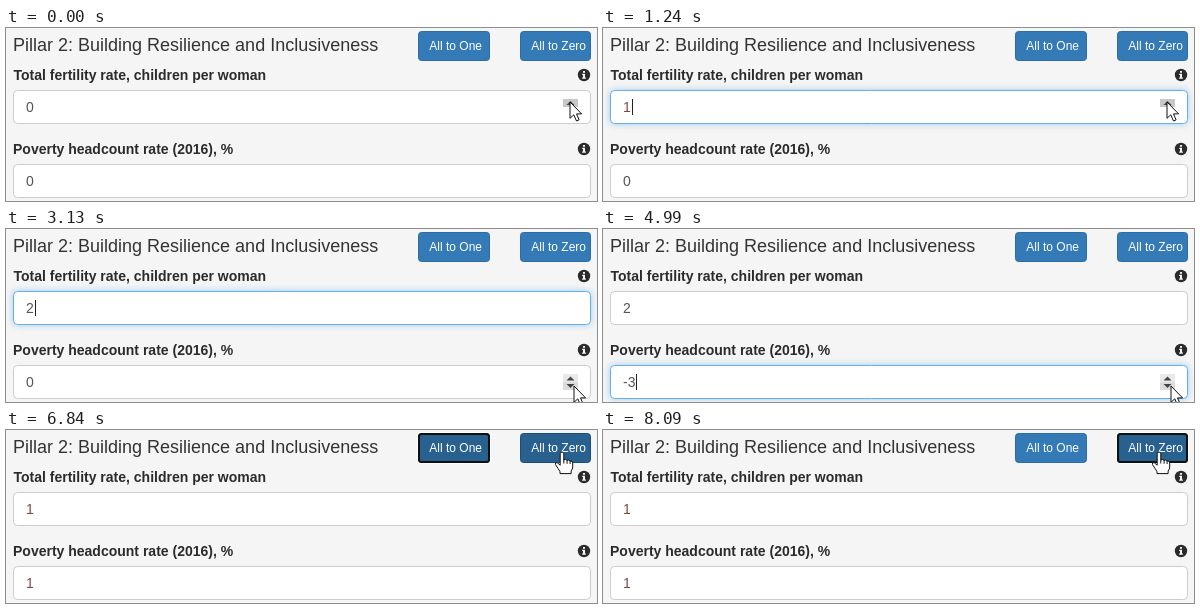
Animation, 591 px wide and 173 px high, one loop 8710 ms. Source, as an HTML page:

```html
<!DOCTYPE html>
<html lang="en">
<head>
<meta charset="utf-8">
<title>Pillar form</title>
<style>
  html, body { margin: 0; width: 100%; height: 100%; overflow: hidden; background: #f5f5f5; }
  svg { display: block; width: 591px; height: 173px; font-family: "Liberation Sans", Arial, sans-serif; }
  .title { font-size: 18px; fill: #333; }
  .label { font-size: 14px; font-weight: bold; fill: #2b2b2b; }
  .value { font-size: 14px; fill: #555; }
  .field { fill: #fff; stroke: #ccc; }
  .field.focus { stroke: #66afe9; filter: drop-shadow(0 0 3.5px rgba(102, 175, 233, .6)); }
  .button text { font-size: 12px; fill: #fff; }
  .button .face { fill: #337ab7; stroke: #2e6da4; }
  .button.dark .face { fill: #286090; stroke: #204d74; }
  .button.down .face { fill: #204d74; stroke: #122b40; }
  .ring { fill: none; }
  .cursor { fill: #fff; stroke: #111; stroke-linejoin: round; }
  #halo { fill: #fbf04a; mix-blend-mode: multiply; }
</style>
</head>
<body>
<svg id="stage" viewBox="0 0 591 173"></svg>
<script>
const stage = document.getElementById('stage');
const LOOP = 8710;

const infoIcon = y => `
  <circle cx="578" cy="${y}" r="6.2" fill="#2b2b2b"/>
  <path d="M577 ${y - 4}h2v1.8h-2zM576.2 ${y - 1.2}h2.8v3.6h.9v1.3h-3.8v-1.3h.9v-2.3h-.8z" fill="#f5f5f5"/>`;

const field = (id, y, label, x) => `
  <text class="label" x="${x}" y="${y - 10}">${label}</text>
  ${infoIcon(y - 15)}
  <rect id="field${id}" class="field" x="7.5" y="${y + .5}" width="577" height="33" rx="4"/>
  <text id="value${id}" class="value" x="20" y="${y + 22}"></text>
  <rect id="caret${id}" y="${y + 9}" width="1" height="16" fill="#222"/>`;

const button = (id, x, width, label) => `
  <g id="${id}" class="button">
    <rect class="face" x="${x + .5}" y="3.5" width="${width - 1}" height="29" rx="3"/>
    <text x="${x + 11.3}" y="22">${label}</text>
    <g class="ring">
      <rect x="${x - .5}" y="2.5" width="${width + 1}" height="31" rx="3.5" stroke="#fff"/>
      <rect x="${x + 1}" y="4" width="${width - 2}" height="28" rx="2.5" stroke="#101010" stroke-width="2"/>
    </g>
  </g>`;

stage.innerHTML = `
  <rect width="591" height="173" fill="#f5f5f5"/>
  <text class="title" x="7" y="23">Pillar 2: Building Resilience and Inclusiveness</text>
  ${button('one', 412, 72, 'All to One')}
  ${button('zero', 514, 71, 'All to Zero')}
  ${field(1, 62, 'Total fertility rate, children per woman', 7.5)}
  ${field(2, 136, 'Poverty headcount rate (2016), %', 7)}
  <g id="spin1">
    <path d="M557 71h15v8h-15z" fill="#c8c8c8"/>
    <path d="M560.5 77l4-4 4 4z" fill="#444"/>
  </g>
  <g id="spin2">
    <path d="M557 145h15v16h-15z" fill="#e9e9e9"/>
    <path d="M557 153h15v8h-15z" fill="#dcdcdc"/>
    <path d="M560.5 151.5l4-4 4 4zM560.5 155l4 4 4-4z" fill="#444"/>
  </g>
  <circle id="halo" cy="21" r="34"/>
  <path id="arrow" class="cursor" d="M0 0V16.3l3.8-3.5 2.7 6.2 2.6-1.1-2.6-6h5.1z"/>
  <g id="hand" class="cursor">
    <path d="M-1.8 1.8a1.8 1.8 0 0 1 3.6 0V8q1.6-1.4 3.3.4q1.6-1 3 .6q2.6-.6 2.6 2v4q0 2-1.6 4v2.6H-2v-2q-1.5-2.5-4.5-7q-.6-2.6 1.6-2l3.1 2.6z"/>
    <path d="M1.8 8v3.5M5.1 8.4v3.4M8.1 9v3"/>
  </g>`;

const ui = {};
stage.querySelectorAll('[id]').forEach(el => ui[el.id] = el);

// Each step changes only what it names; everything else carries over.
const steps = [
  { at: 0, a: '0', b: '0', focus: 0, caret: false, one: '', zero: '', halo: 0, pointer: 'arrow', x: 564, y: 74, spin: 1 },
  { at: 620, a: '1', focus: 1, caret: true },
  { at: 1870, a: '2' },
  { at: 3130, x: 568, y: 157, spin: 2 },
  { at: 3750, b: '-1', focus: 2 },
  { at: 4360, b: '-2' },
  { at: 4990, b: '-3' },
  { at: 5600, caret: false, spin: 0, pointer: 'hand', x: 473, y: 21, one: 'dark' },
  { at: 6220, one: 'down ring', halo: 470 },
  { at: 6840, a: '1', b: '1', focus: 0, halo: 0, x: 556, y: 22, one: 'dark ring', zero: 'dark' },
  { at: 7460, one: '', zero: 'down ring', halo: 554 },
  { at: 8090, zero: 'dark ring', halo: 0 }
];

const show = (el, on) => el.style.display = on ? '' : 'none';

function drawField(id, value, s) {
  const focused = s.focus === id;
  const text = ui['value' + id], caret = ui['caret' + id];
  text.textContent = value;
  text.style.fill = value === '1' ? '#7d4a40' : '';
  ui['field' + id].classList.toggle('focus', focused);
  caret.setAttribute('x', value[0] === '-' ? 33 : 29);
  show(caret, focused && s.caret);
  show(ui['spin' + id], s.spin === id);
}

function drawButton(el, look) {
  el.classList.toggle('dark', look.includes('dark'));
  el.classList.toggle('down', look.includes('down'));
  show(el.querySelector('.ring'), look.includes('ring'));
}

function draw(time) {
  const t = time % LOOP;
  const s = Object.assign({}, ...steps.filter(step => step.at <= t));
  drawField(1, s.a, s);
  drawField(2, s.b, s);
  drawButton(ui.one, s.one);
  drawButton(ui.zero, s.zero);
  show(ui.halo, s.halo);
  ui.halo.setAttribute('cx', s.halo);
  for (const name of ['arrow', 'hand']) show(ui[name], s.pointer === name);
  ui[s.pointer].setAttribute('transform', `translate(${s.x} ${s.y})`);
}

const start = performance.now();
function tick() {
  draw(performance.now() - start);
  requestAnimationFrame(tick);
}
tick();
</script>
</body>
</html>
```
